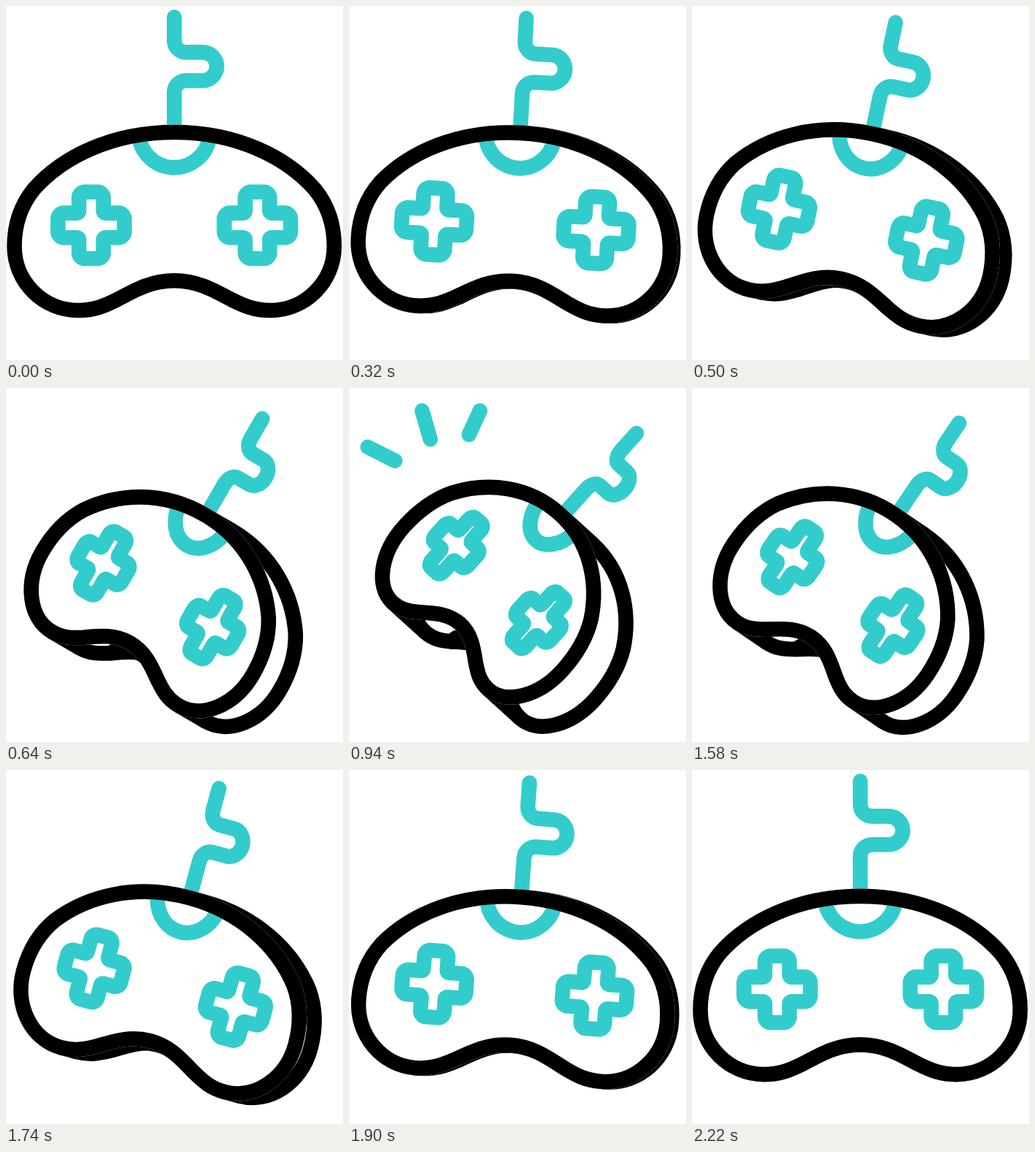
Recreate the animation shown at these times as an HTML page with a canvas. Size 463 by 485 pixels, loop 2.4 s.

```html
<!DOCTYPE html>
<html lang="en">
<head>
<meta charset="utf-8">
<title>Gamepad</title>
<style>
  html, body { margin: 0; width: 100%; height: 100%; overflow: hidden; background: #fff; }
  canvas { display: block; }
</style>
</head>
<body>
<canvas id="stage" width="463" height="485"></canvas>
<script>
const ctx = document.getElementById('stage').getContext('2d');
const TEAL = '#33cccc', LOOP = 2400, SWING = 1120, MAX_TILT = 43;

// Left half of the body outline, from the top middle to the bottom middle
const half = [
  [0, -127], [-86, -127], [-154, -93], [-193, -49],
  [-210, -28], [-219.7, -1], [-219.7, 29],
  [-219.7, 77.6], [-180.5, 117], [-132, 117],
  [-110, 117], [-96, 111], [-78, 102],
  [-52, 88], [-31, 76.3], [0, 76.3]
];
const outline = half.concat(half.slice(0, -1).reverse().map(([x, y]) => [-x, y]));

// Rays: inner end, outer end
const rays = [
  [64, 100, 20, 78],
  [112, 71, 98.6, 25.2],
  [164.5, 64.5, 182.2, 26.2]
];

const clamp = v => Math.min(1, Math.max(0, v));
const smooth = v => { v = clamp(v); return v * v * (3 - 2 * v); };

// Cubic bezier easing (.77, 0, .27, 1)
function ease(x) {
  let lo = 0, hi = 1;
  for (let i = 0; i < 24; i++) {
    const s = (lo + hi) / 2, r = 1 - s;
    if (3 * .77 * r * r * s + 3 * .27 * r * s * s + s * s * s < x) lo = s; else hi = s;
  }
  return smooth(lo);
}

function tiltAt(t) {
  if (t >= 2 * SWING) return 0;
  return MAX_TILT * (t < SWING ? ease(t / SWING) : 1 - ease(t / SWING - 1));
}

function place(tilt, dy = 0) {
  const a = tilt * Math.PI / 180, c = Math.cos(a), s = Math.sin(a), k = 1 - .00788 * tilt;
  const x = 231.2 - tilt * (.965 - .0076 * tilt);
  const y = 300 + tilt * (.336 - .0357 * tilt + .000212 * tilt * tilt);
  ctx.setTransform(c * k, s * k, -s, c, x, y + dy);
}

// Strokes keep an even width whatever the shape's transform
function stroke(color) {
  ctx.save();
  ctx.resetTransform();
  ctx.strokeStyle = color;
  ctx.stroke();
  ctx.restore();
}

function bodyPath(shift) {
  ctx.beginPath();
  ctx.moveTo(outline[0][0] + shift, outline[0][1]);
  for (let i = 1; i < outline.length; i += 3) {
    ctx.bezierCurveTo(...outline.slice(i, i + 3).flatMap(([x, y]) => [x + shift, y]));
  }
  ctx.closePath();
}

// Rear shell, joined to the front one along its edges
function rear(d) {
  bodyPath(d);
  ctx.fillStyle = '#fff';
  ctx.fill();
  stroke('#000');
  ctx.beginPath();
  for (const [x, y] of [[0, -127], [-132, 117], [132, 117]]) {
    ctx.moveTo(x, y);
    ctx.lineTo(x + d, y);
  }
  const dip = 76.3 + .1 * d;
  ctx.moveTo(d - 78, 102);
  ctx.bezierCurveTo(.7 * d - 52, 88, .6 * d - 31, dip, .5 * d, dip);
  ctx.bezierCurveTo(.25 * d + 31, dip, 52, 88, 78, 102);
  stroke('#000');
}

function cable() {
  ctx.beginPath();
  ctx.moveTo(0, -284.7);
  ctx.arcTo(0, -236.6, 39, -236.6, 16);
  ctx.lineTo(39, -236.6);
  ctx.arc(39, -217.2, 19.4, -Math.PI / 2, Math.PI / 2);
  ctx.arcTo(0, -197.8, 0, -135, 16);
  ctx.lineTo(0, -135);
  stroke(TEAL);
}

function collar() {
  ctx.beginPath();
  ctx.arc(0, -127.6, 49, .1, Math.PI - .1);
  stroke(TEAL);
}

function pad(cx) {
  const L = 45.6, W = 16.8, corners = [];
  for (let i = 0, x = 1, y = 0; i < 4; i++, [x, y] = [-y, x]) {
    for (const [u, v, r] of [[L, -W, 8], [L, W, 8], [W, W, 3]]) {
      corners.push([cx + u * x - v * y, .4 + u * y + v * x, r]);
    }
  }
  ctx.beginPath();
  ctx.moveTo(cx + L, .4);
  for (let i = 1; i <= 12; i++) {
    const [x, y, r] = corners[i % 12], [nx, ny] = corners[(i + 1) % 12];
    ctx.arcTo(x, y, nx, ny, r);
  }
  ctx.closePath();
  stroke(TEAL);
}

function burst(t) {
  const head = smooth((t - 740) / 260), tail = smooth((t - 930) / 150);
  if (head <= tail || tail >= 1) return;
  ctx.beginPath();
  for (const [x0, y0, x1, y1] of rays) {
    const at = k => [x0 + (x1 - x0) * k, y0 + (y1 - y0) * k];
    ctx.moveTo(...at(tail));
    ctx.lineTo(...at(head));
  }
  stroke(TEAL);
}

function draw(t) {
  const tilt = tiltAt(t), depth = 1.42 * tilt / (1 - .00788 * tilt);
  ctx.resetTransform();
  ctx.clearRect(0, 0, 463, 485);
  ctx.lineWidth = 20.6;
  ctx.lineCap = ctx.lineJoin = 'round';

  burst(t);
  place(tilt, .155 * tilt);
  cable();

  place(tilt);
  if (depth > .01) rear(depth);
  bodyPath(0);
  ctx.fillStyle = '#fff';
  ctx.fill();
  ctx.lineCap = 'butt';
  collar();
  pad(-114.2);
  pad(114.2);
  bodyPath(0);
  stroke('#fff');
  stroke('#000');
}

function tick() {
  draw(performance.now() % LOOP);
  requestAnimationFrame(tick);
}
tick();
</script>
</body>
</html>
```
